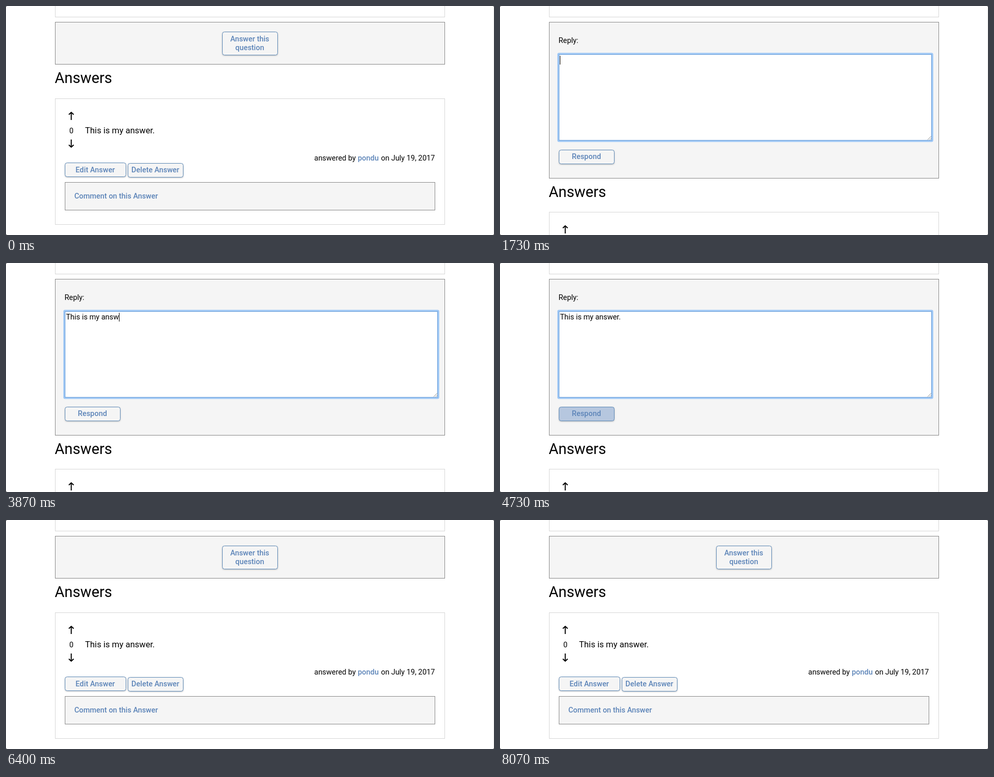
Animation of 946x446 px, one loop 8140 ms. Source, as an HTML page:

```html
<!DOCTYPE html>
<html lang="en">
<head>
<meta charset="utf-8">
<title>Answer form</title>
<style>
  html, body { margin: 0; width: 100%; height: 100%; overflow: hidden; background: #fff; }
  svg { display: block; width: 946px; height: 446px; }
  text { font: 14.4px Roboto, sans-serif; white-space: pre; }
  .link { font-weight: 500; fill: #5c84b8; }
  .heading { font-size: 28.8px; }
  .body { font-size: 16.5px; }
  .mid { text-anchor: middle; }
  .card { fill: #fff; stroke: #d6d6d6; }
  .panel { fill: #f5f5f5; stroke: #888; }
  .face { fill: #f5f5f5; filter: drop-shadow(0 1px 1.5px rgba(0, 0, 0, .3)); }
  .hover { fill: #b4c6df; }
  .edge { fill: none; stroke: #5f8bb8; }
  .ring { fill: none; stroke: #9bc6f6; stroke-width: 2.6; }
  .arrow { fill: none; stroke: #000; stroke-width: 2; }
</style>
</head>
<body>
<svg id="stage" viewBox="0 0 946 446"></svg>
<script>
const LOOP = 8140;
const FORM_OPEN = 1200, FORM_CLOSE = 6000;
const FOCUS_IN = 1470, FOCUS_OUT = 5270;
const BLINK = 500;
const MESSAGE = "This is my answer.";
const KEY_TIMES = [2530, 2600, 2670, 2800, 2870, 2930, 3070, 3130, 3200,
                   3330, 3400, 3530, 3600, 3730, 3870, 4000, 4070, 4130];

const rect = (cls, x, y, w, h, r = 0) =>
  `<rect class="${cls}" x="${x + .5}" y="${y + .5}" width="${w}" height="${h}" rx="${r}"/>`;
const text = (cls, x, y, content) =>
  `<text class="${cls}" x="${x}" y="${y}">${content}</text>`;

function button(id, x, y, w, h, lines) {
  const labels = lines.map(([label, baseline]) =>
    text("link mid", x + w / 2, baseline, label)).join("");
  return `<g id="${id}">
    ${rect("ring", x - 2, y - 2, w + 4, h + 4, 3)}
    ${rect("face", x, y, w, h, 4)}
    ${rect("hover", x, y, w, h, 4)}
    ${rect("edge", x, y, w, h, 4)}
    ${labels}</g>`;
}

const arrow = (tip, tail, back) =>
  `<path class="arrow" d="M126.5 ${tail}V${tip + back * .25}
    M121.8 ${tip + back}L126.5 ${tip + back * .2}L131.2 ${tip + back}"/>`;

const stage = document.getElementById("stage");
stage.innerHTML = `
  <rect width="946" height="446" fill="#fff"/>
  ${rect("card", 95, -20, 755, 41)}

  <g id="prompt">
    ${rect("panel", 95, 31, 755, 82)}
    ${button("ask", 419, 50, 107, 45, [["Answer this", 69], ["question", 86]])}
  </g>

  <g id="form">
    ${rect("panel", 95, 31, 755, 304)}
    ${text("", 113.4, 72, "Reply:")}
    <g id="glow">${rect("ring", 112, 92, 726, 171, 2)}</g>
    <rect id="area" x="114.5" y="94.5" width="722" height="167" fill="#fff"/>
    <path d="M829 260.5l7-7M833 260.5l3-3" stroke="#888" fill="none"/>
    <text id="typed" x="116.2" y="110"></text>
    <rect id="caret" y="97" width="1" height="17"/>
    ${button("respond", 114, 280, 107, 27, [["Respond", 298]])}
  </g>

  <g id="title">${text("heading", 94.5, 150, "Answers")}</g>
  <g id="answer">
    ${rect("card", 95, 180, 755, 245)}
    ${arrow(206, 222, 5.5)}
    ${text("mid", 126.7, 248, "0")}
    ${arrow(276, 260, -5.5)}
    ${text("body", 153.2, 248, MESSAGE)}
    ${text("", 597.6, 301, "answered by")}
    ${text("link mid", 702.2, 301, "pondu")}
    ${text("", 727, 301, "on July 19, 2017")}
    ${button("edit", 114, 305, 118, 27, [["Edit Answer", 324]])}
    ${button("remove", 236, 306, 107, 27, [["Delete Answer", 324]])}
    ${rect("panel", 114, 343, 717, 54)}
    ${text("link", 132.4, 375, "Comment on this Answer")}
  </g>

  <path d="M945.5 0V446" stroke="#e6e6e6"/>
  <path d="M0 0h2l-2 2zM946 0h-2l2 2zM0 446h2l-2-2zM946 446h-2l2-2z" fill="#777"/>`;

const get = id => document.getElementById(id);
const show = (node, visible) => node.setAttribute("display", visible ? "inline" : "none");
const ease = p => {
  const c = Math.min(1, Math.max(0, p));
  return c * c * (3 - 2 * c);
};

function setButton(id, hover, focused) {
  get(id).querySelector(".hover").setAttribute("opacity", hover);
  show(get(id).querySelector(".ring"), focused);
}

function render(t) {
  const open = t >= FORM_OPEN && t < FORM_CLOSE;
  const focused = t >= FOCUS_IN && t < FOCUS_OUT;
  show(get("prompt"), !open);
  show(get("form"), open);
  get("title").setAttribute("transform", `translate(0 ${open ? 222 : 0})`);
  get("answer").setAttribute("transform", `translate(0 ${open ? 221 : 0})`);

  setButton("ask", t < FORM_CLOSE ? ease((t - 500) / 300) : 0, t >= 1070 && t < FORM_CLOSE);
  setButton("respond", ease((t - 4470) / 300), t >= FOCUS_OUT);
  setButton("edit", 0, false);
  setButton("remove", 0, false);

  show(get("glow"), focused);
  get("area").setAttribute("stroke", focused ? "#5d97d8" : "#8c8c8c");

  const count = KEY_TIMES.filter(k => k <= t).length;
  const typed = get("typed");
  typed.textContent = MESSAGE.slice(0, count);
  const lastInput = count ? KEY_TIMES[count - 1] : FOCUS_IN + 30;
  const lit = Math.floor(Math.max(0, t - lastInput) / BLINK) % 2 === 0;
  const width = open && count ? typed.getComputedTextLength() : 0;
  get("caret").setAttribute("x", Math.round(116.2 + width));
  show(get("caret"), focused && lit);
}

const start = performance.now();
function tick() {
  render((performance.now() - start) % LOOP);
  requestAnimationFrame(tick);
}
tick();
</script>
</body>
</html>
```
